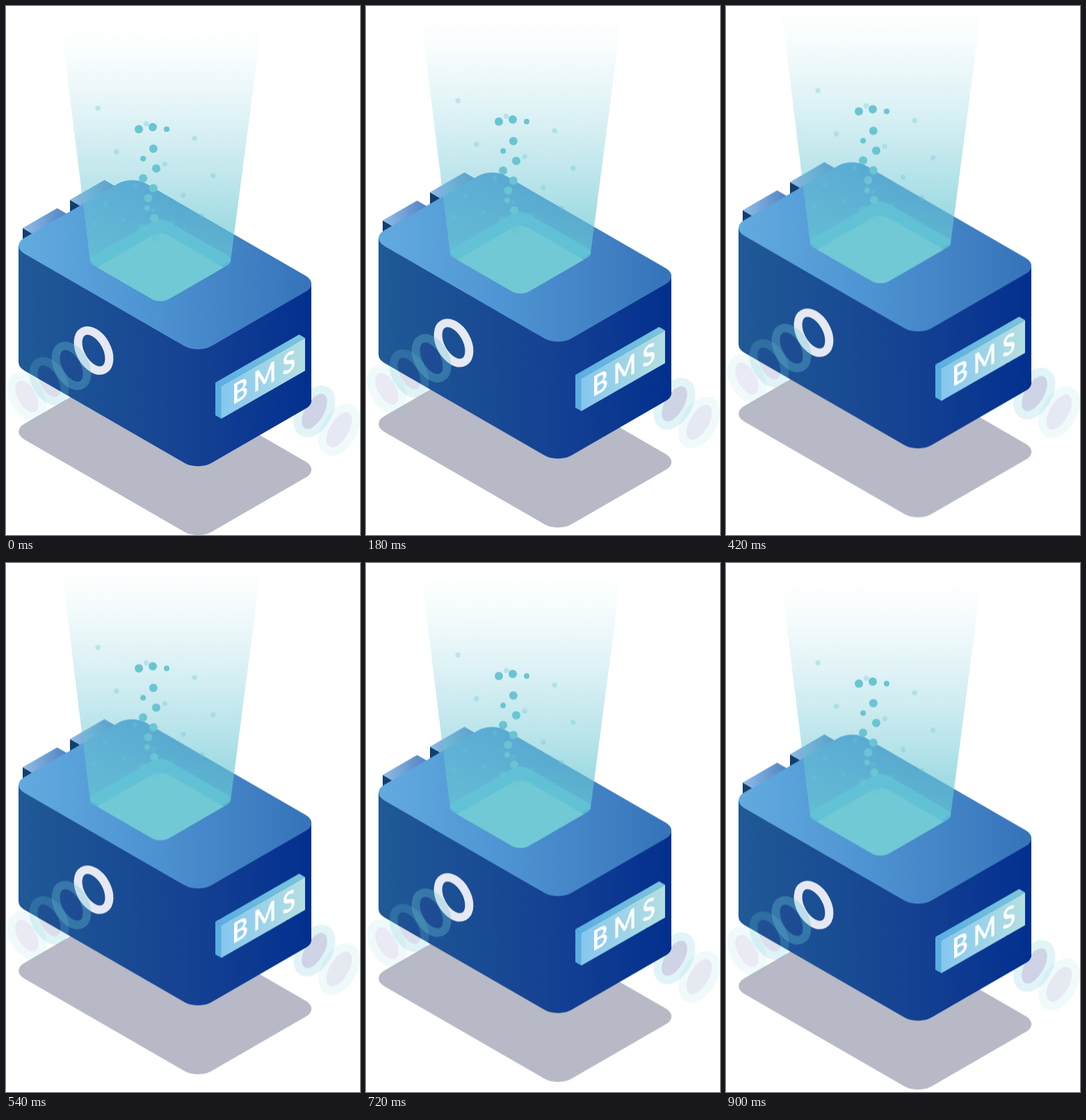
Write an HTML page that moves like this. It is 509 px wide and 760 px high and loops after 960 ms.

```html
<!DOCTYPE html>
<html lang="en">
<head>
<meta charset="utf-8">
<title>Floating battery</title>
<style>
  html, body { margin: 0; width: 100%; height: 100%; overflow: hidden; background: #fff; }
  svg { display: block; width: 100%; height: 100%; }
  .plate { font: 700 40px Lato, "Open Sans", sans-serif; fill: #fff; text-anchor: middle; }
</style>
</head>
<body>
<svg viewBox="0 0 509 760">
  <defs>
    <linearGradient id="side" gradientUnits="userSpaceOnUse" x1="18" x2="439" y1="0" y2="0">
      <stop offset="0" stop-color="#205a96"/>
      <stop offset=".6" stop-color="#154193"/>
      <stop offset="1" stop-color="#03308f"/>
    </linearGradient>
    <linearGradient id="lid" gradientUnits="userSpaceOnUse" x1="18" x2="439" y1="0" y2="0">
      <stop offset="0" stop-color="#62abdf"/>
      <stop offset=".4" stop-color="#5096d4"/>
      <stop offset="1" stop-color="#3673b9"/>
    </linearGradient>
    <linearGradient id="cap">
      <stop offset="0" stop-color="#8fbde7"/>
      <stop offset="1" stop-color="#4f80c1"/>
    </linearGradient>
    <linearGradient id="beam" gradientUnits="userSpaceOnUse" x1="0" x2="0" y1="30" y2="370"></linearGradient>
    <linearGradient id="front">
      <stop offset="0" stop-color="#86c7ef"/>
      <stop offset="1" stop-color="#b4e0e2"/>
    </linearGradient>
    <linearGradient id="rim">
      <stop offset="0" stop-color="#5aaee3"/>
      <stop offset="1" stop-color="#7cc6dc"/>
    </linearGradient>
    <path id="slab"/>
    <path id="opening"/>
    <clipPath id="hole"><use href="#opening"/></clipPath>
    <g id="post">
      <path fill="#123f6b" d="M0 0 L14 8 V24 H0Z"/>
      <path fill="url(#cap)" d="M0 0 L49.5 -28.5 L66 -19 L16.5 10Z"/>
    </g>
  </defs>
  <g id="scene">
    <use href="#slab" y="267" fill="#b7b9c6"/>
    <g id="behind"></g>
    <use href="#post" x="24" y="319"/>
    <use href="#post" x="92" y="278.5"/>
    <use href="#slab" y="168" fill="url(#side)"/>
    <path fill="url(#side)" d="M18 344.4 L439 399 V567 L18 512.4Z"/>
    <use href="#slab" fill="url(#lid)"/>
    <path fill="url(#beam)" d="M79.5 30 L121 366 L222 424 L323 366 L367 30Z"/>
    <use href="#opening" fill="#62c5d8" opacity=".8"/>
    <g clip-path="url(#hole)"><use href="#opening" y="20" fill="#70c9d4"/></g>
    <g id="dots" fill="#6ac4d2"></g>
    <g id="ahead"></g>
    <path fill="#5aaee0" d="M301 541 L310 546 V593 L301 588Z"/>
    <path fill="url(#rim)" d="M301 541 L421.5 472 L430 477 L309.5 546Z"/>
    <path fill="url(#front)" d="M309.5 546 L430 477 V524 L309.5 593Z"/>
    <text class="plate" transform="matrix(.866 -.5 0 1 328 572)" x="10 51 91">BMS</text>
  </g>
</svg>
<script>
const $ = id => document.getElementById(id);

function add(parent, name, attrs) {
  const el = document.createElementNS("http://www.w3.org/2000/svg", name);
  for (const key in attrs) el.setAttribute(key, attrs[key]);
  $(parent).append(el);
}

// Rounded isometric rectangle; (x, y) is its unrounded top corner.
function tile(x, y, w, d, r) {
  const p = (u, v) => `${x + .866 * (u - v)} ${y + .5 * (u + v)}`;
  const arc = `A${1.2247 * r} ${.7071 * r} 0 0 1 `;
  return `M${p(r, 0)}L${p(w - r, 0)}${arc}${p(w, r)}L${p(w, d - r)}${arc}${p(w - r, d)}` +
    `L${p(r, d)}${arc}${p(0, d - r)}L${p(0, r)}${arc}${p(r, 0)}Z`;
}

$("slab").setAttribute("d", tile(181.4, 243.6, 310.9, 201.6, 22.5));
$("opening").setAttribute("d", tile(222, 302.9, 125.2, 125.2, 14));

// The light grows stronger towards its base.
for (let t = 0; t <= 1; t += .125) {
  add("beam", "stop", { offset: t, "stop-color": "#68c5d3", "stop-opacity": .78 * t ** 1.35 });
}

function ellipse(parent, cx, cy, rx, ry, tilt, attrs) {
  add(parent, "ellipse", { cx, cy, rx, ry, transform: `rotate(${tilt} ${cx} ${cy})`, ...attrs });
}

function ring(parent, cx, cy, rx, ry, tilt, color, band, hole) {
  ellipse(parent, cx, cy, rx - 6, ry - 6, tilt, { fill: "#26368c", opacity: hole });
  ellipse(parent, cx, cy, rx, ry, tilt, { fill: "none", stroke: color, "stroke-width": 12, opacity: band });
}

// Each ring has echoes that fade as they move away.
const teal = "#6cc8d4";
ring("ahead", 126, 495, 19, 31.1, -29, "#e6e9f3", 1, 0);
for (let i = 1; i <= 3; i++) {
  ring("ahead", 126 - 32 * i, 495 + 22 * i, 19, 31.1, -29, teal, .43 - .11 * i, .28 - .06 * i);
}
for (let i = 1; i <= 2; i++) {
  ring("behind", 408 + 35.5 * i, 556 + 26.5 * i, 19.6, 34, 30, teal, .3 - .1 * i, .33 - .11 * i);
}

const dot = (cx, cy, r, opacity) => add("dots", "circle", { cx, cy, r, opacity });

// A swaying column with a fan of three on top, among scattered faint dots.
for (let i = 0; i < 3; i++) dot(191 + 20 * i, 174 + 3 * Math.abs(i - 1) ** 2, i < 2 ? 6 : 4, 1);
for (let i = 0; i < 10; i++) {
  dot(206 + 10 * Math.cos(2.67 * (i - 2)), 205 + 14.2 * i, i % 5 === 1 ? 4 : 6, i < 8 ? 1 : .5);
}
for (let i = 0; i < 14; i++) {
  dot(126 + 182 * (i * .618 % 1), 313 - 166 * (i / 13) ** 1.8, 3.7, .33);
}

// Rise and sink in eight even steps each way.
const at = y => ({ transform: `translateY(${y}px)`, easing: "steps(8, end)" });
$("scene").animate([at(0), at(-29.3), at(0)], { duration: 960, iterations: Infinity });
</script>
</body>
</html>
```
